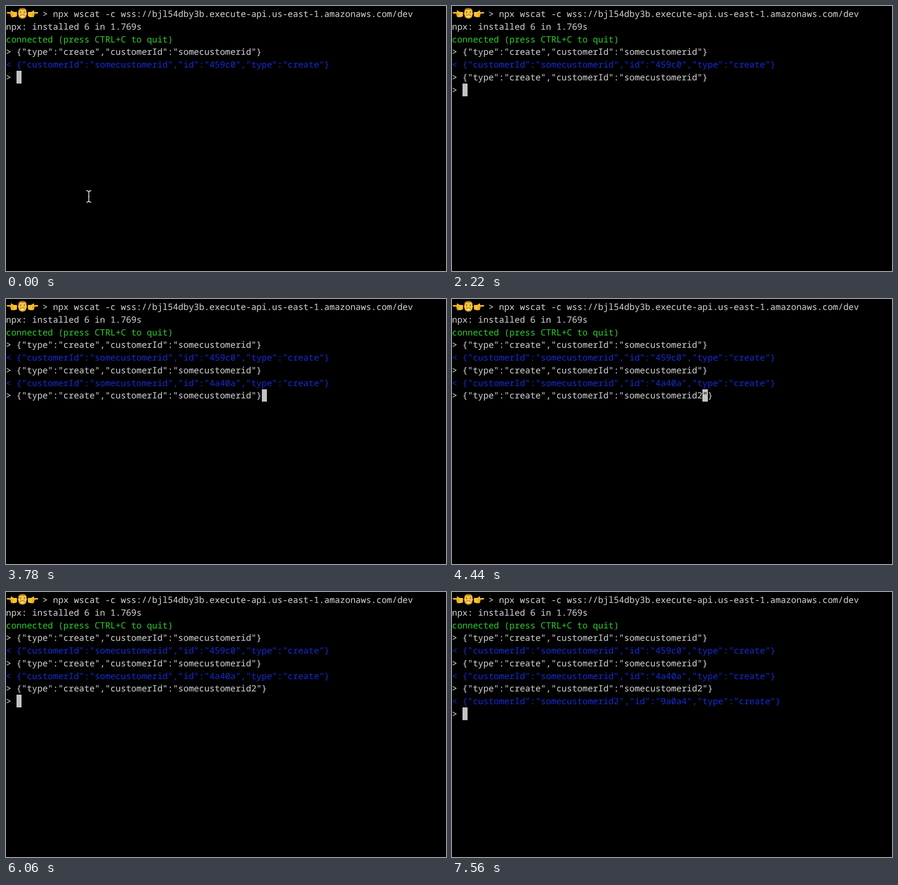
Recreate the animation shown at these times as an HTML page. Size 963 px wide and 581 px high, loop 7620 ms.

```html
<!DOCTYPE html>
<html lang="en">
<head>
<meta charset="utf-8">
<title>Terminal session</title>
<style>
  html, body { margin: 0; width: 100%; height: 100%; overflow: hidden; background: #000; }
  #screen {
    --col: 11.424px; --row: 27.75px;
    position: absolute; left: 0; top: 3.4px; margin: 0; color: #c7c7c7;
    font: 19.04px/27.75px "Noto Sans Mono", monospace;
    font-variant-ligatures: none; text-rendering: geometricPrecision; white-space: pre;
    -webkit-text-stroke: .15px;
  }
  .line { position: absolute; left: 0; margin-top: .8px; }
  .note { color: #2bc02b; }
  .reply { color: #1529c4; }
  #caret {
    position: absolute; width: var(--col); height: var(--row);
    background: #c3c3c3; color: #000;
  }
  svg { position: absolute; left: 0; top: 0; }
</style>
</head>
<body>
<div id="screen"><div id="lines"></div><div id="caret"></div></div>
<svg width="963" height="581" viewBox="0 0 963 581">
  <defs>
    <g id="hand">
      <path fill="#fbc02d" d="M1.5 14.5Q2 13 4 13.2L11 13.6Q9.6 10.4 11.5 9.8Q13 9.6 14.5 12L18 13H24V22.5L19 24.5H13Q10.5 24.3 11 22.5Q9.5 21.5 10.2 20Q9 18.5 9.8 16.8L3.5 16.5Q1.5 16.3 1.5 14.5Z"/>
      <path fill="none" stroke="#c07d16" stroke-width=".8" d="M10 16.8h5.5M10.4 19.6h5M11 22.2h4"/>
    </g>
  </defs>
  <use href="#hand"/>
  <use href="#hand" transform="matrix(-1 0 0 1 72 0)"/>
  <g>
    <ellipse cx="36" cy="16.5" rx="10.6" ry="4" fill="#f6b62c"/>
    <path fill="#a8782f" d="M26.8 15Q25.500 4.500 36 4.300Q46.500 4.500 45.200 15V20Q44 28 36 28Q28 28 26.800 20Z"/>
    <path fill="#fdc93b" d="M27.800 13Q28.500 8.500 32 7.800Q37 8.800 41.500 7.500Q44.200 9.500 44.200 13V19Q43 26 36 26.200Q29 26 27.800 19Z"/>
    <path fill="none" stroke="#6d421b" stroke-width=".9" d="M30.200 12q1.500-1 3 0M38.800 12q1.500-1 3 0"/>
    <g fill="#3f2a18"><circle cx="32" cy="14.500" r="1.100"/><circle cx="40" cy="14.500" r="1.100"/></g>
    <path fill="none" stroke="#a8782f" stroke-width="1.600" d="M31 21.500Q33 19 36 19.500Q39 19 41 21.500"/>
    <path fill="#fff" d="M33 21.200h6q-1 2-3 2t-3-2Z"/>
  </g>
  <path id="pointer" fill="none" stroke="#eee" stroke-width="1.7"
    d="M176 404.800q5.300 0 5.300 4v17.400q0 4-5.300 4M186.600 404.800q-5.300 0-5.300 4M186.600 430.200q-5.300 0-5.300-4M180 417.500h2.600"/>
</svg>
<script>
const LOOP = 7620, COL = 11.424, ROW = 27.75;
const lines = document.getElementById('lines');
const caret = document.getElementById('caret');
const pointer = document.getElementById('pointer');

const request = id => `> {"type":"create","customerId":"${id}"}`;
const reply = (id, key) => `< {"customerId":"${id}","id":"${key}","type":"create"}`;
const first = 'somecustomerid', second = first + '2', prompt = '> ';

const intro = [
  ' '.repeat(7) + '> npx wscat -c wss://bjl54dby3b.execute-api.us-east-1.amazonaws.com/dev',
  'npx: installed 6 in 1.769s',
  'connected (press CTRL+C to quit)',
  request(first),
  reply(first, '459c0')
];
const afterReply = [...intro, request(first), reply(first, '4a40a')];
const sent = [...afterReply, request(second)];

// Start time, visible lines, caret distance from the end of the last line
const steps = [
  [0, [...intro, prompt], 0],
  [420, [...intro, request(first)], 0],
  [1260, [...intro, request(first), prompt], 0],
  [2760, [...afterReply, prompt], 0],
  [3480, [...afterReply, request(first)], 0],
  [3960, [...afterReply, request(first)], 1],
  [4080, [...afterReply, request(first)], 2],
  [4380, sent, 2],
  [5160, [...sent, prompt], 0],
  [6360, [...sent, reply(second, '9a0a4'), prompt], 0]
];

function lineElement(text, row) {
  const el = document.createElement('div');
  const kind = text.startsWith('<') ? 'reply' : text.startsWith('connected') ? 'note' : '';
  el.className = `line ${kind}`;
  el.style.top = row * ROW + 'px';
  el.textContent = text;
  return el;
}

function show([start, content, back]) {
  const last = content.at(-1), col = last.length - back;
  lines.replaceChildren(...content.map(lineElement));
  caret.style.left = col * COL + 'px';
  caret.style.top = (content.length - 1) * ROW + 'px';
  caret.textContent = last[col] || '';
  pointer.style.display = start === 0 ? '' : 'none';
}

let current;
function tick() {
  const time = performance.now() % LOOP;
  const step = steps.findLast(([start]) => start <= time);
  if (step !== current) show(current = step);
  requestAnimationFrame(tick);
}
tick();
</script>
</body>
</html>
```
